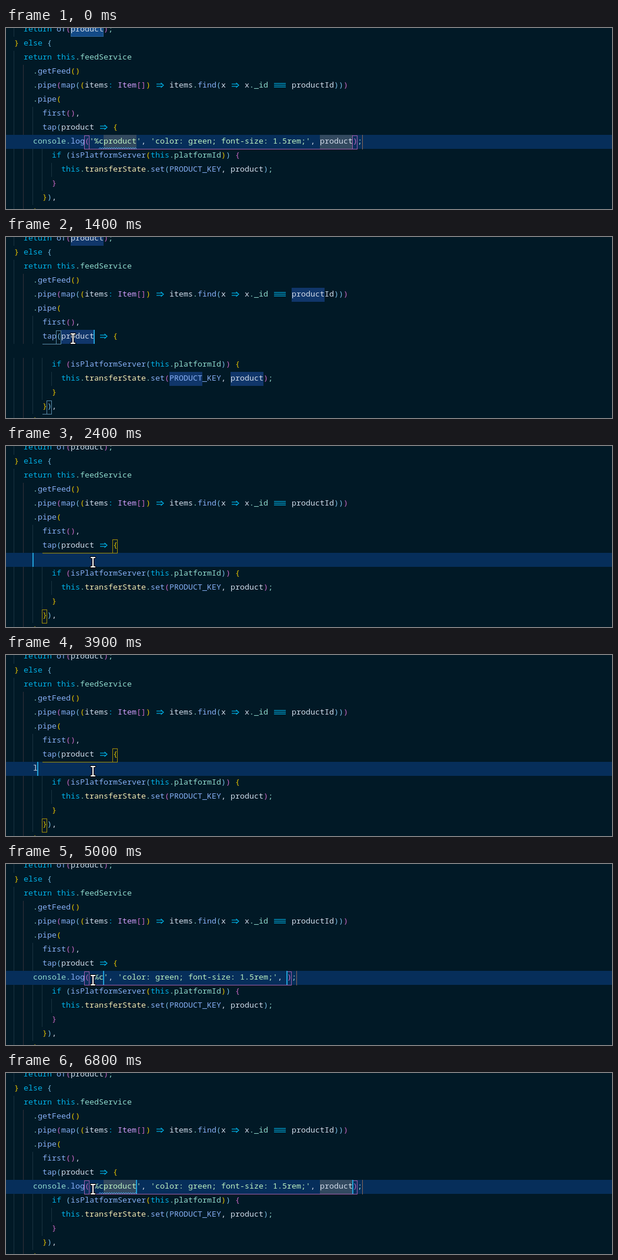
Write an HTML page with a canvas that moves like this. It is 1031x310 px and loops after 8000 ms.

```html
<!DOCTYPE html>
<html lang="en">
<head>
<meta charset="utf-8">
<title>Console log snippet</title>
<style>
html, body { margin: 0; width: 100%; height: 100%; overflow: hidden; background: #011926; }
canvas { display: block; }
</style>
</head>
<body>
<canvas id="stage" width="1031" height="310"></canvas>
<script>
const ctx = document.getElementById('stage').getContext('2d');
const LOOP = 8000, LEFT = 14, CELL = 8, ROW = 24, ACTIVE = 8;
const GOLD = '#e6c200', ORCHID = '#c868c4', SKY = '#78b9e0';
const PAIRS = [GOLD, ORCHID, SKY];
const GOLD_LINE = '#a38e0a', ORCHID_LINE = '#a25ca8', SKY_LINE = '#5a8ba8';
const TEXT = '#d0dae8', KEY = '#00b0e6', FUNC = '#87aff4', PROP = '#91dacd', STRING = '#bcf0c0';
const HIGHLIGHT = '#062e5a', MATCH = '#10366a', FIELD = '#32495f', CARET = '#219fd5';

const before = [
  '  return of(product);',
  '} else {',
  '  return this.feedService',
  '    .getFeed()',
  '    .pipe(map((items: Item[]) => items.find(x => x._id === productId)))',
  '    .pipe(',
  '      first(),',
  '      tap(product => {'
];
const after = [
  '        if (isPlatformServer(this.platformId)) {',
  '          this.transferState.set(PRODUCT_KEY, product);',
  '        }',
  '      }),',
  '    );'
];
const snippet = word => `    console.log('%c${word}', 'color: green; font-size: 1.5rem;', ${word});`;

const inks = { transferState: '#f7ecb5', Item: '#d29ffc', ':': KEY, '=>': KEY, '===': KEY };
const paint = (color, words) => words.split(' ').forEach(w => inks[w] = color);
paint(KEY, 'return else if this');
paint(FUNC, 'of getFeed pipe map find first tap log isPlatformServer set PRODUCT_KEY');
paint(PROP, 'feedService platformId _id console . ;');

const colX = col => LEFT + col * CELL;
const rowY = row => row * ROW - 9;

function rect(color, x, y, w, h) {
  ctx.fillStyle = color;
  ctx.fillRect(x, y, w, h);
}

function line(color, width, ...points) {
  ctx.strokeStyle = color;
  ctx.lineWidth = width;
  ctx.beginPath();
  for (let i = 0; i < points.length; i += 2) ctx.lineTo(points[i], points[i + 1]);
  ctx.stroke();
}

function frame(color, x, y, w, h) {
  ctx.strokeStyle = color;
  ctx.lineWidth = 1;
  ctx.strokeRect(x + .5, y + .5, w - 1, h - 1);
}

function write(text, x, y, color, size = 12.57, weight = 400) {
  ctx.font = `${weight} ${size}px "Noto Sans Mono", "DejaVu Sans Mono", monospace`;
  ctx.fillStyle = color;
  ctx.fillText(text, x, y);
}

// Every opening bracket takes the next colour; its partner repeats it.
function bracketInks() {
  const open = [];
  let count = 1;
  return mark => {
    if ('([{'.includes(mark)) {
      open.push(PAIRS[count++ % 3]);
      return open.at(-1);
    }
    return open.pop() || GOLD;
  };
}

function code(text, x, y, bracket, cell = CELL) {
  for (const { 0: token, index } of text.matchAll(/'[^']*'?|===|=>|_id|\w+|[^\s\w]/g)) {
    const at = x + index * cell;
    if (token === '=>') {
      line(KEY, 1.2, at + 2, y - 6, at + 12, y - 6);
      line(KEY, 1.2, at + 2, y - 2, at + 12, y - 2);
      line(KEY, 1.2, at + 9.5, y - 8, at + 14, y - 4, at + 9.5, y);
    } else if (token === '===') {
      for (const dy of [7, 4, 1]) line(KEY, 1.2, at + 2, y - dy, at + 22, y - dy);
    } else {
      const color = token[0] === "'" ? STRING
        : /[()[\]{}]/.test(token) ? bracket(token) : inks[token] || TEXT;
      write(token, at, y, color, cell / .6);
    }
  }
}

function mark(color, row, col, length = 7) {
  rect(color, colX(col), rowY(row), length * CELL, ROW);
}

function bracketBox(color, row, col) {
  frame(color, colX(col) - 1, rowY(row) + 1, 9, ROW);
}

function underline(color, row, from, to) {
  rect(color, colX(from), rowY(row + 1), (to - from) * CELL, 1);
}

function caret(col, row = ACTIVE) {
  rect(CARET, colX(col) - 1, rowY(row), 2, ROW);
}

function squiggle(from, to) {
  const points = [];
  for (let x = from; x <= to; x += 2) points.push(x, x / 2 % 2 ? 207 : 204.5);
  line('#4a9fe0', 1, ...points);
}

function guides(lines) {
  lines.forEach((text, row) => {
    if (row === ACTIVE) return;
    const indent = text.search(/\S/);
    for (let col = 0; col < indent; col += 2)
      rect(col === 2 ? '#33303a' : '#193240', colX(col) - 1, rowY(row), 1, ROW);
  });
}

function popup(withDetail) {
  rect('#2c3043', 71, 208, 317, 102);
  rect('#5f7e97', 71, 208, 317, 24);
  [['log', ', Console'], ['log', 't'], ['log', ', Log to the console'], ['log', 'ging']].forEach(([hit, rest], i) => {
    const y = 219 + i * 24;
    if (i < 3) frame('#c3ccd8', 75, y - 5, 12, 12);
    else {
      line('#c3ccd8', 1.3, 79, y - 2, 79, y + 6, 86, y + 6, 86, y - 3, 82, y - 3);
      line('#c3ccd8', 1.3, 82, y - 6, 75, y - 3, 77, y);
    }
    write(hit, 91, y + 4, '#fff', 12.57, 700);
    write(rest, 91 + 3 * 7.54, y + 4, TEXT);
  });
  if (!withDetail) return;
  rect('#2c3043', 388, 208, 319, 72);
  rect('#153a60', 697, 208, 10, 52);
  write('Log output to console (User Snippet)', 394, 227, '#979eae');
  code("console.log('%c', 'color: green; font-", 394, 266, () => GOLD, 7.54);
  line('#aab2c0', 1, 688, 213, 695, 220);
  line('#aab2c0', 1, 688, 220, 695, 213);
}

function pointer(t) {
  const stops = [[500, 250, 117], [1200, 114, 174], [1500, 114, 174], [2200, 147, 207], [2400, 148, 199]];
  if (t < stops[0][0]) return;
  let [, x, y] = stops.at(-1);
  const next = stops.findIndex(s => s[0] > t);
  if (next > 0) {
    const a = stops[next - 1], b = stops[next];
    const p = (t - a[0]) / (b[0] - a[0]), k = p * p * (3 - 2 * p);
    x = a[1] + (b[1] - a[1]) * k;
    y = a[2] + (b[2] - a[2]) * k;
  }
  x = Math.round(x);
  y = Math.round(y);
  for (const [color, grow] of [['#000', 1], ['#fff', 0]]) {
    for (const dy of [-9, 7]) rect(color, x - 4 - grow, y + dy - grow, 8 + 2 * grow, 2 + 2 * grow);
    rect(color, x - 1 - grow, y - 8, 2 + 2 * grow, 16);
  }
}

function activeText(t) {
  if (t < 100 || t >= 6500) return snippet('product');
  if (t >= 4800) return snippet('');
  return t < 3900 ? '' : '    ' + 'log'.slice(0, 1 + Math.floor((t - 3900) / 100));
}

function draw(t) {
  const text = activeText(t), lines = [...before, text, ...after];
  const logged = text.includes('console'), filled = logged && text.includes('product');
  const clicked = t >= 1300 && t < 2000, selected = clicked && t >= 1400;
  const typing = t >= 4000 && t < 4800;

  rect('#011926', 0, 0, 1031, 310);
  if (!selected) rect(HIGHLIGHT, 0, rowY(clicked ? 7 : ACTIVE), 1031, ROW);
  guides(lines);
  if (t < 100) {
    mark('#134a86', 0, 12);
    frame('#2a6295', colX(12), rowY(0), 56, ROW);
  }
  if (selected) [[0, 12], [4, 59], [7, 10], [10, 33], [10, 46]].forEach(([row, col]) => mark(MATCH, row, col));
  if (filled) [19, 65].forEach(col => mark(FIELD, ACTIVE, col));

  const bracket = bracketInks();
  lines.forEach((s, row) => code(s, LEFT, row * ROW + 6, bracket));

  if (logged) {
    const end = text.length - 2;
    bracketBox(ORCHID_LINE, ACTIVE, 15);
    bracketBox(ORCHID_LINE, ACTIVE, end);
    underline(ORCHID_LINE, ACTIVE, 15, end + 1);
    rect('#8a6656', colX(text.length), 183, 1, 25);
    if (t >= 4800) {
      caret(filled ? 26 : 19);
      caret(end);
    }
    if (t < 100 || t >= 6800) squiggle(158, 222);
    if (t >= 5200 && t < 5400) squiggle(46, 70);
  } else if (clicked) {
    bracketBox(SKY_LINE, 7, 9);
    bracketBox(SKY_LINE, 12, 7);
    underline(SKY_LINE, 7, 6, 10);
    underline(SKY_LINE, 12, 6, 8);
    caret(17, 7);
  } else {
    bracketBox(GOLD_LINE, 7, 21);
    bracketBox(GOLD_LINE, 12, 6);
    underline(GOLD_LINE, 7, typing ? 4 : 6, 22);
    if (typing) line(GOLD_LINE, 1, 45.5, 183, 45.5, 280.5, 70, 280.5);
    caret(text.length || 4);
  }

  if (t >= 4200 && t < 4800) popup(t >= 4400);
  pointer(t);
}

const start = performance.now();
function tick() {
  draw((performance.now() - start) % LOOP);
  requestAnimationFrame(tick);
}
tick();
</script>
</body>
</html>
```
